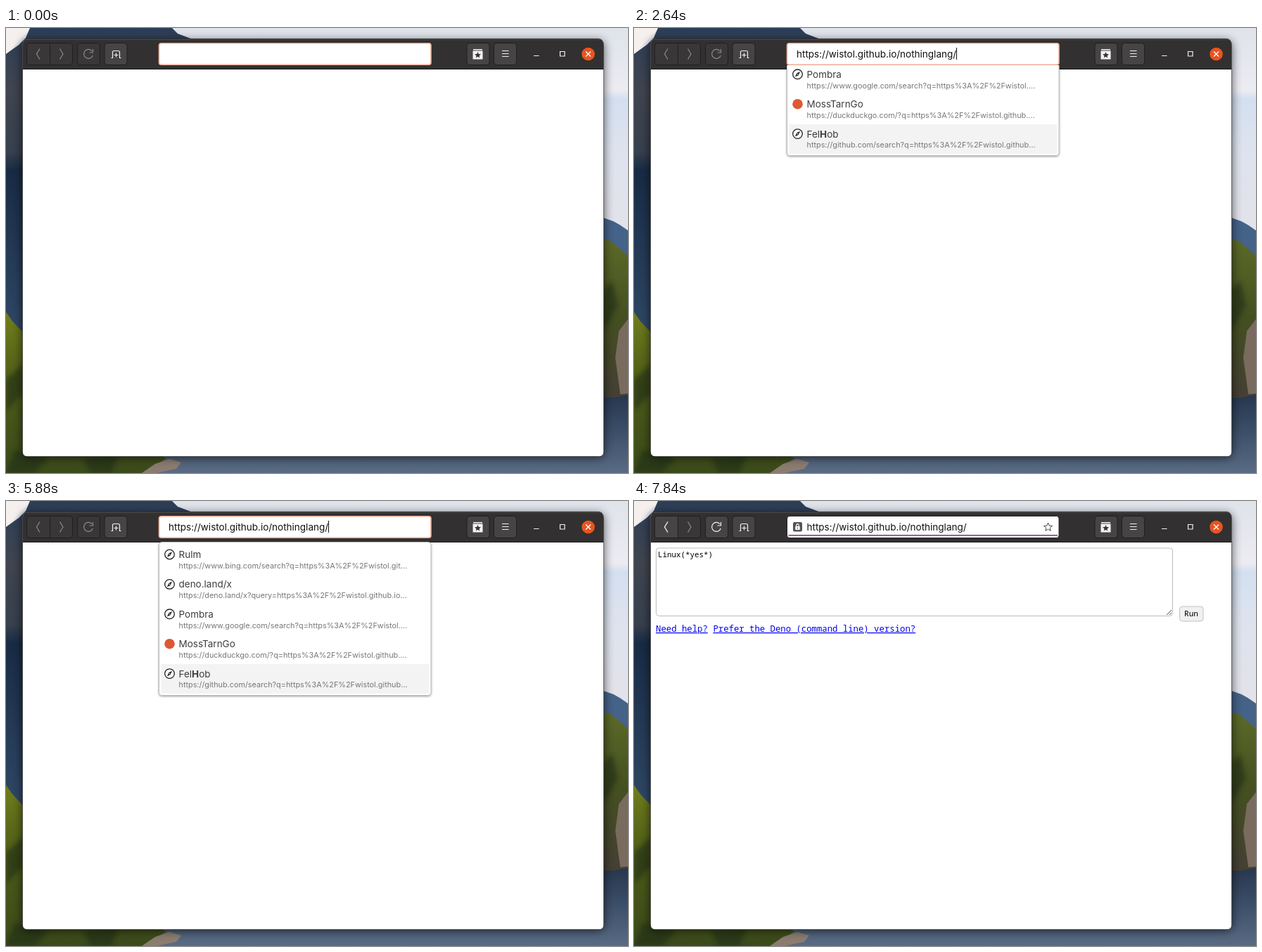
These frames come from a looping animation (884x633 px, 8000 ms). An HTML page:

```html
<!DOCTYPE html>
<html lang="en">
<head>
<meta charset="utf-8">
<title>Opening a page in the browser</title>
<style>
  html, body { margin: 0; width: 100%; height: 100%; overflow: hidden; }
  svg { display: block; width: 884px; height: 633px; }
  text { font-family: Inter, "Noto Sans", sans-serif; font-size: 13.5px; fill: #3d3d3d; white-space: pre; }
  .sub { font-size: 10.85px; fill: #777; }
  .mono { font-family: "Noto Sans Mono", "DejaVu Sans Mono", monospace; fill: #000; }
  .link { font-size: 12.3px; fill: #00e; text-decoration: underline; }
  .button { fill: #464444; stroke: #201e1e; }
  .line { fill: none; stroke: #f2f2f2; stroke-width: 1.2; }
  .off { stroke: #8d8a8a; }
</style>
</head>
<body>
<svg viewBox="0 0 884 633">
  <defs>
    <linearGradient id="sky" x2="0" y2="1">
      <stop offset="0" stop-color="#dfe3ea"/><stop offset=".14" stop-color="#ececf2"/>
      <stop offset=".16" stop-color="#d3dff0"/><stop offset=".26" stop-color="#dde3ee"/>
      <stop offset=".43" stop-color="#e2e2ea"/>
    </linearGradient>
    <linearGradient id="cliff" x2="0" y2="1">
      <stop offset="0" stop-color="#2c3e58"/><stop offset=".2" stop-color="#40454f"/>
      <stop offset=".4" stop-color="#37404e"/><stop offset=".46" stop-color="#182b45"/>
      <stop offset="1" stop-color="#304967"/>
    </linearGradient>
    <linearGradient id="bush" x2="0" y2="1">
      <stop offset="0" stop-color="#717e1b"/><stop offset=".45" stop-color="#4d5b18"/>
      <stop offset="1" stop-color="#3b4a1b"/>
    </linearGradient>
    <linearGradient id="slope" x2="0" y2="1">
      <stop offset="0" stop-color="#5c6a28"/><stop offset=".5" stop-color="#444f20"/>
      <stop offset="1" stop-color="#453f35"/>
    </linearGradient>
    <linearGradient id="sea" x2="0" y2="1">
      <stop offset="0" stop-color="#24344b"/><stop offset=".5" stop-color="#3c4f69"/>
      <stop offset="1" stop-color="#5a6c84"/>
    </linearGradient>
    <filter id="shadow" x="-10%" y="-10%" width="120%" height="120%">
      <feGaussianBlur stdDeviation="7"/>
    </filter>
    <filter id="soft" x="-50%" y="-50%" width="200%" height="200%">
      <feGaussianBlur stdDeviation="3"/>
    </filter>
    <filter id="softShadow" x="-5%" y="-10%" width="110%" height="120%">
      <feDropShadow dx="0" dy="1" stdDeviation="1.5" flood-opacity=".4"/>
    </filter>
    <clipPath id="window"><path d="M24 609V23q0-8 8-8H841q8 0 8 8V603q0 6-6 6H30q-6 0-6-6Z"/></clipPath>
    <clipPath id="belowField"><path d="M200 53H620V300H200Z"/></clipPath>
    <g id="compass">
      <circle r="6.8" fill="#fff" stroke="#222" stroke-width="1.3"/>
      <path d="M3.6-3.8 1.2 1.5-3.6 3.8-1.2-1.5Z" fill="#222"/>
      <circle r=".8" fill="#fff"/>
    </g>
    <path id="star" d="M0-6 1.7-1.9 6-1.6 2.7 1.2 3.7 5.4 0 3.1-3.7 5.4-2.7 1.2-6-1.6-1.7-1.9Z"/>
  </defs>

  <!-- Coast wallpaper -->
  <rect width="884" height="633" fill="url(#sky)"/>
  <path d="M0 0H36L0 38Z" fill="#f5efed"/>
  <path d="M34 0H236L244 8 265 16V440H0V37L18 24 28 14Z" fill="url(#cliff)"/>
  <path d="M840 268Q862 271 884 288V345H840Z" fill="#456388"/>
  <path d="M180 516H884V633H180Z" fill="url(#sea)"/>
  <path d="M840 299 860 303 884 324V522L862 526H840Z" fill="url(#slope)"/>
  <path d="M884 414 871 431 866 469 873 521 884 520Z" fill="#796b5d"/>
  <path d="M0 404 9 417 24 433 60 600H196L228 612 197 633H0Z" fill="url(#bush)"/>
  <path d="M0 500 24 478V520L0 545ZM12 600 60 612 40 633H0ZM110 612 160 608 150 633H120ZM849 372 862 360 870 395 849 430Z"
    fill="#1f2b12" opacity=".55" filter="url(#soft)"/>
  <path d="M193 633 212 620 232 613 249 618 242 627 214 633Z" fill="#8c7c70"/>

  <!-- Browser window -->
  <rect x="23" y="18" width="827" height="593" rx="8" opacity=".62" filter="url(#shadow)"/>
  <rect x="23.5" y="15.5" width="826" height="594" rx="8" fill="#fff" stroke="#222" stroke-opacity=".65"/>
  <g clip-path="url(#window)">
    <rect x="24" y="16" width="825" height="593" fill="#fff"/>
    <rect x="24" y="15" width="825" height="44" fill="#323030"/>
    <path d="M24 16.5H849" stroke="#4b4949"/>
    <path d="M24 58.5H849" stroke="#1d1b1b"/>
  </g>

  <g id="page">
    <rect x="31.5" y="67" width="734" height="96.5" rx="4" fill="#fff" stroke="#bdbdbd"/>
    <path d="M757 162 764 155M761 162 764 159" stroke="#555"/>
    <text class="mono" x="34" y="80" style="font-size:10.85px">Linux(*yes*)</text>
    <rect x="775.5" y="150" width="33.5" height="21" rx="4" fill="#f1f0f0" stroke="#c4c1bf"/>
    <text class="mono" x="782" y="164" style="font-size:11.1px">Run</text>
    <text class="mono link" x="31" y="186">Need help?</text>
    <text class="mono link" x="112.4" y="186">Prefer the Deno (command line) version?</text>
  </g>

  <g id="status">
    <path d="M24 586.5H214q3 0 3 3V609H30q-6 0-6-6Z" fill="#fff"/>
    <path d="M24 586.5H214q3 0 3 3V609" fill="none" stroke="#c6c6c6"/>
    <text x="35" y="602.5">Loading “wistol.github.io”…</text>
  </g>

  <!-- Header buttons -->
  <rect class="button" x="29.5" y="21.5" width="65" height="31" rx="4" style="fill:#393737"/>
  <path id="backFill" d="M33.5 22H62V52H33.5Q30 52 30 48.5V25.5Q30 22 33.5 22Z" fill="#464444"/>
  <path d="M62.5 22V52" stroke="#201e1e"/>
  <path class="line off" d="M48 29.5 43.5 37 48 44.5M76.5 29.5 81 37 76.5 44.5"/>
  <path id="backArrow" class="line" d="M48 29.5 43.5 37 48 44.5"/>
  <rect id="reload" class="button" x="101.5" y="21.5" width="32" height="31" rx="4"/>
  <path id="reloadArrow" class="line" d="M122.3 33A6.5 6.5 0 1 0 123.3 39M123.5 30V35H118.5"/>
  <g id="stop">
    <circle cx="117" cy="37" r="7.5" fill="none" stroke="#a3a1a1"/>
    <path d="M114.5 31H119.5L123 34.5V39.5L119.5 43H114.5L111 39.5V34.5Z" fill="#cfcfcf"/>
  </g>
  <rect class="button" x="140" y="21.5" width="32" height="31" rx="4"/>
  <path class="line" d="M149.5 42.5H151.5V34.5Q151.5 32.5 153.5 32.5H159.5Q161.5 32.5 161.5 34.5V42.5H163.5M156.5 35.5V41.5M153.5 38.5H159.5"/>
  <rect class="button" x="655" y="21.5" width="32" height="31" rx="4"/>
  <path d="M664 30H677V31.5H664ZM663.5 32.5H677.5V44.5H663.5Z" fill="#f2f2f2"/>
  <use href="#star" transform="translate(670.5 38.5) scale(.75)" fill="#333"/>
  <rect class="button" x="693.5" y="21.5" width="32" height="31" rx="4"/>
  <path class="line" d="M705 32.5H714.5M705 36.5H714.5M705 40.5H714.5"/>
  <path class="line" d="M750 39.5H757.5M787.5 33.5H794V40H787.5Z"/>
  <circle cx="827.5" cy="37" r="9.3" fill="#e95420"/>
  <path d="M824 33.5 831 40.5M831 33.5 824 40.5" stroke="#fff" stroke-width="1.4"/>

  <!-- Suggestions slide under the address field -->
  <g clip-path="url(#belowField)">
    <g id="suggestions">
      <rect x="217.5" y="58.5" width="386.5" height="218" rx="4" fill="#fff" stroke="#b9b9b9" filter="url(#softShadow)"/>
      <rect x="220.5" y="232" width="380.5" height="42" fill="#f3f3f3"/>
    </g>
  </g>

  <rect x="217.5" y="21.5" width="386.5" height="31" rx="3.5" fill="#fff" stroke="#201e1e"/>
  <rect id="focus" x="217.5" y="21.8" width="386.5" height="30.4" rx="3" fill="#fff" stroke="#f0ab93" stroke-width="1.6"/>
  <g id="visited">
    <rect x="226" y="30" width="13" height="13.5" rx="2" fill="#555"/>
    <rect x="229.3" y="36" width="6.4" height="5" rx=".5" fill="#fff"/>
    <path d="M230.8 36V34.5Q230.8 32.7 232.5 32.7T234.2 34.5V36" fill="none" stroke="#fff" stroke-width="1.2"/>
    <path d="M232.5 37.5V39.5" stroke="#555"/>
    <use href="#star" x="588.5" y="37" fill="none" stroke="#444"/>
    <rect id="progress" x="219.5" y="48" height="1.7" fill="#8b4885"/>
  </g>
  <text id="address" y="41.5" style="fill:#111">https://wistol.github.io/nothinglang/</text>
  <path id="caret" d="M.5 28V45" stroke="#111"/>
</svg>

<script>
const $ = id => document.getElementById(id);
const show = (id, on) => { $(id).style.visibility = on ? "visible" : "hidden"; };
const between = (t, start, end) => t >= start && t < end;

const query = "https%3A%2F%2Fwistol.";
const engines = [
  ["Rulm", `https://www.bing.com/search?q=${query}git…`],
  ["deno.land/x", `https://deno.land/x?query=${query}github.io…`],
  ["Pombra", `https://www.google.com/search?q=${query}…`],
  ["MossTarnGo", `https://duckduckgo.com/?q=${query}github.…`],
  ["Fel<tspan font-weight='700'>H</tspan>ob", `https://github.com/search?q=${query}github…`],
];
$("suggestions").innerHTML += engines.map(([name, link], i) => {
  const y = 76 + i * 42.4;
  const icon = i === 3
    ? `<circle cx="232.5" cy="${y}" r="7.3" fill="#de5833"/>`
    : `<use href="#compass" x="232.5" y="${y}"/>`;
  return `${icon}<text x="245.5" y="${y + 5}">${name}</text>
    <text class="sub" x="245.5" y="${y + 19.8}">${link}</text>`;
}).join("");

// Held values: [start time, value]
const slide = [[0, -240], [2640, -95], [2820, 0], [6180, -94], [6420, -177], [6600, -210], [6860, -240]];
const loaded = [[0, 219.5], [6180, 278], [6420, 325], [6600, 365], [6860, 425], [7120, 488], [7280, 541], [7540, 602]];
const valueAt = (steps, t) => steps.findLast(([start]) => t >= start)[1];

function draw(t) {
  const typed = t >= 2400, entered = t >= 6180;
  const offset = valueAt(slide, t);
  show("suggestions", offset > -240);
  $("suggestions").setAttribute("transform", `translate(0 ${offset})`);

  show("address", typed);
  $("address").setAttribute("x", entered ? 245.5 : 231);
  show("caret", between(t, 960, 4640) || between(t, 5880, 6180));
  const caretX = typed ? 231 + $("address").getComputedTextLength() : 231;
  $("caret").setAttribute("transform", `translate(${Math.round(caretX)} 0)`);

  show("focus", !entered);
  show("visited", entered);
  $("progress").setAttribute("width", valueAt(loaded, t) - 219.5);
  show("status", between(t, 6180, 7120));
  show("page", t >= 6600);

  const ready = t >= 6600 ? 1 : t >= 6420 ? 0.5 : 0;
  $("backFill").style.opacity = $("backArrow").style.opacity = ready;
  $("stop").style.opacity = entered ? 1 - ready : 0;
  $("reload").style.fill = entered ? "#464444" : "#393737";
  $("reloadArrow").style.stroke = ready ? "#f2f2f2" : "#8d8a8a";
  $("reloadArrow").style.opacity = entered ? ready : 1;
}

const begin = performance.now();
function tick() {
  draw((performance.now() - begin) % 8000);
  requestAnimationFrame(tick);
}
tick();
</script>
</body>
</html>
```
